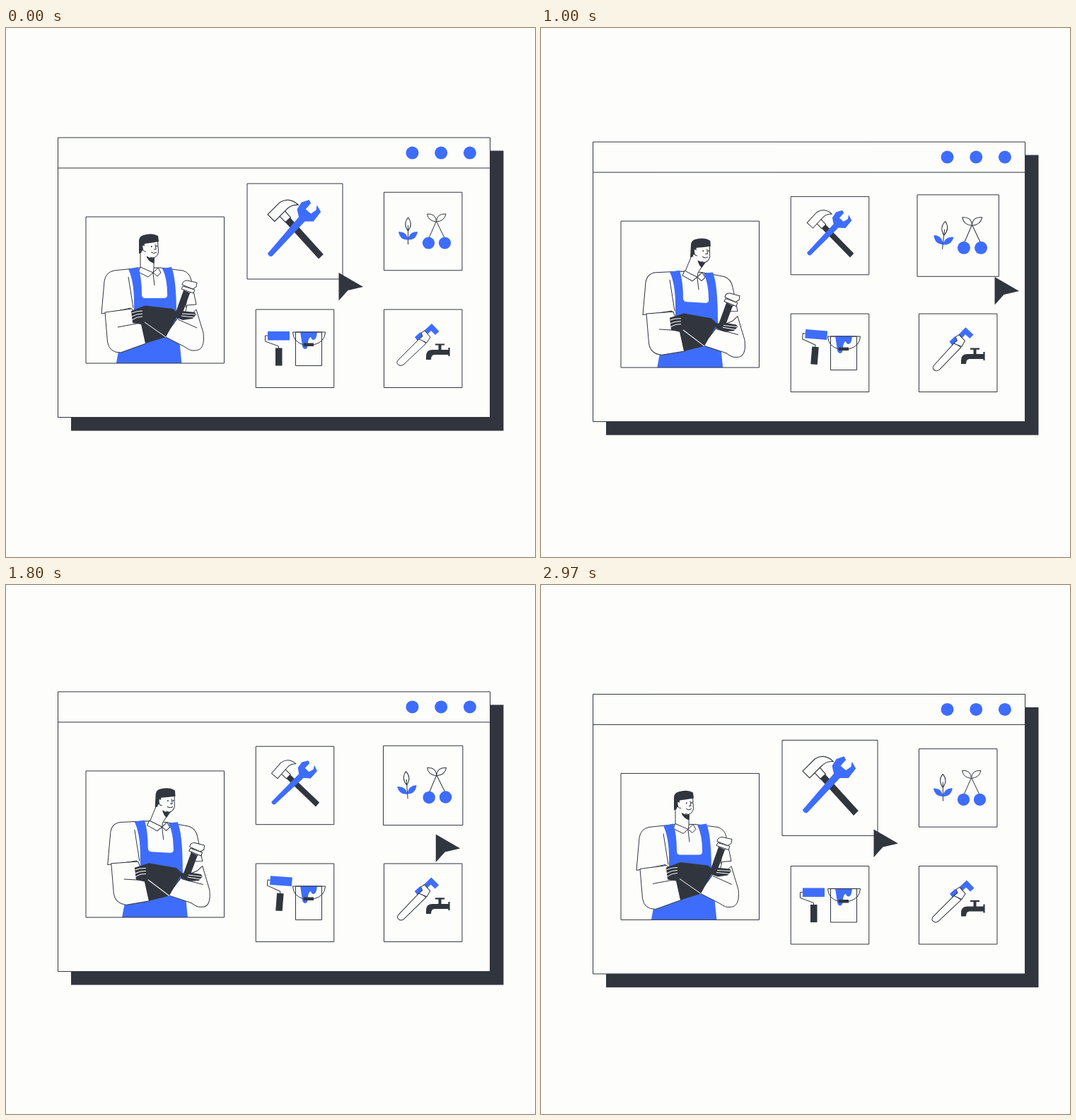
Animation of 748 by 748 pixels, one loop 3.01 s. Source, as an HTML page with a canvas:

```html
<!DOCTYPE html>
<html lang="en">
<head>
<meta charset="utf-8">
<title>Repair services</title>
<style>
html, body { margin: 0; width: 100%; height: 100%; overflow: hidden; background: #fdfdfc; }
canvas { display: block; width: 748px; height: 748px; }
</style>
</head>
<body>
<canvas id="stage" width="748" height="748"></canvas>
<script>
const ctx = document.getElementById('stage').getContext('2d');
const LOOP = 3010;
const DARK = '#31363e', BLUE = '#3e6dfb', PAPER = '#fdfdfc';

// progress from a to b, eased at both ends
function ease(t, a, b) {
  const p = Math.min(1, Math.max(0, (t - a) / (b - a)));
  return p * p * (3 - 2 * p);
}
const bump = (t, a, b, c, d) => ease(t, a, b) - ease(t, c, d);

function fill(d, color) {
  ctx.fillStyle = color;
  ctx.fill(new Path2D(d));
}
function line(d, color = DARK, width = 1) {
  ctx.strokeStyle = color;
  ctx.lineWidth = width;
  ctx.stroke(new Path2D(d));
}
function shape(d, color = PAPER) {
  fill(d, color);
  line(d);
}
function disc(x, y, r) {
  ctx.fillStyle = BLUE;
  ctx.beginPath();
  ctx.arc(x, y, r, 0, 7);
  ctx.fill();
}
function group(draw) {
  ctx.save();
  draw();
  ctx.restore();
}
function turn(deg, x, y) {
  ctx.translate(x, y);
  ctx.rotate(deg * Math.PI / 180);
  ctx.translate(-x, -y);
}
function zoom(k, x, y) {
  ctx.translate(x, y);
  ctx.scale(k, k);
  ctx.translate(-x, -y);
}
function frame(cx, cy, w, h = w) {
  ctx.strokeStyle = DARK;
  ctx.lineWidth = 1;
  ctx.strokeRect(cx - w / 2, cy - h / 2, w, h);
}

function drawWindow() {
  ctx.fillStyle = DARK;
  ctx.fillRect(92, 173.5, 611.5, 396);
  ctx.fillStyle = PAPER;
  ctx.fillRect(73.5, 155, 611, 395.5);
  frame(379, 352.75, 611, 395.5);
  line('M73.5 198H684.5');
}

function drawDots(t) {
  for (let i = 0; i < 3; i++) {
    let lift = 0;
    for (let n = 0; n < 3; n++) {
      const p = (t - 168 - n * 935 - i * 78) / 410;
      if (p > 0 && p < 1) lift = 12 * Math.sin(Math.PI * p) ** 1.5;
    }
    disc(574.5 + i * 40.7, 176.5 - lift, 9);
  }
}

function drawHead(h) {
  ctx.translate(23 * h, 0);
  turn(3 * h, 202, 320);
  fill('M190 302L214 300L215 318Q214 324 208 325L196 322L190 315Z', PAPER);
  line('M214.5 301L215.5 317Q214 324 208 325L204 324');
  fill('M188 319L188 301Q188 295 194 293Q207 289 215 294L216 302Q205 304 196 305L195 314Q192 314 191 318Z', DARK);
  shape('M196 308Q192 305 193 311Q194 317 198 316');
  line('M211 306L212 313L209 313');
  line('M205 317Q209 320 213 317');
  ctx.fillStyle = DARK;
  ctx.fillRect(205, 308, 1.5, 2);
  ctx.fillRect(212.5, 307.5, 1.5, 2);
}

function drawNeck(h, b) {
  const top = 23 * h, low = 13 * b;
  shape(`M${190 + top} 316L${190 + low} 340L${208 + low} 347L${209 + low} 340L${209 + top} 324Z`);
  fill(`M${198 + top} 321Q${202 + top} 326 ${210 + top} 325L${209.5 + (top + low) / 2} 333Q${200 + top} 330 ${198 + top} 321Z`, DARK);
}

function drawHammer(b) {
  ctx.translate(2 * b, 9 * b);
  fill('M251 371L260 375L249 405L240 402Z', DARK);
  shape('M253 364L263 367L260 375L251 371Z');
  shape('M248 369L250 365L267 370L265 375Z');
  shape('M249 363Q250 357 256 357L270 360L269 366L264 369Z');
}

function drawArms(b) {
  const d = 6 * b, x = -4 * b;
  shape(`M140 402L143.5 444Q146 459 162 459L${198 + x} ${446 + d}L${191 + x} ${414 + d}L178 397Z`);
  line(`M158 423L${190 + x} ${417 + d}`);
  shape(`M269 398L279 431Q282 456 267 456Q261 457 253 451L${224 + x} ${436 + d}L${243 + x} ${410 + d}L262 405Z`);
  line(`M${243 + x} ${412 + d}L270 424`);
  group(() => drawHammer(b));
  group(() => {
    ctx.translate(x, d);
    fill('M177 400L197 392.5L236 397L244 404L226 437L197 446L191 419L179 417Z', DARK);
    for (let i = 0; i < 3; i++) line(`M178 ${403 + i * 5}Q185 ${400 + i * 4} 193 ${400 + i * 4}`, PAPER);
    line('M196 416L226 437', PAPER);
  });
  group(() => {
    ctx.translate(0, 8 * b);
    fill('M237 403L248 400L267 402L269 405L264 411L250 413L239 409Z', DARK);
    line('M249 404L268 405M248 407L266 409', PAPER);
  });
}

function drawWorker(t) {
  const b = bump(t, 250, 650, 1760, 2197);
  const h = bump(t, 250, 795, 1760, 2305);
  group(() => {
    ctx.beginPath();
    ctx.rect(113, 267, 195.5, 207);
    ctx.clip();
    const k = 0.06 * b;
    const lean = () => ctx.transform(1, k, 0, 1, 9 * b, -210 * k);
    group(() => {
      lean();
      shape('M190 339L153 343Q141 345 139 358L135 404Q155 401 176 396L184 450H242L256 392L269 391L262 357Q260 346 250 343L218 339Z');
      line('M173 352L180 396M257 374L254 395');
    });
    drawNeck(h, b);
    group(() => drawHead(h));
    group(() => {
      lean();
      group(() => {
        ctx.translate(4 * b, 0);
        line('M208 347L210 364');
        shape('M187 345L190 338L208 346L201 352Z');
        shape('M208 346L215 339L219 346L214 351Z');
      });
      fill('M173 341L187 338Q192 353 192 377Q192 382 197 382H223Q229 382 228 376Q228 354 221 340L234 338Q241 355 241 405L245 440L250 490H153L159 457L182 446L181 396Q182 360 173 341Z', BLUE);
      drawArms(b);
    });
  });
  frame(210.75, 370.5, 195.5, 207);
}

function drawTools(spread) {
  group(() => {
    turn(-spread, 409, 290);
    fill('M396.5 276L403 271.5L441.5 314L436 319.5Z', DARK);
    shape('M390 269L396.5 263.5L403.5 271.5L397.5 277Z');
    shape('M377 268L391 254Q402 247 412.5 257Q404 256 398 263L385 276Z');
  });
  group(() => {
    turn(spread, 409, 287);
    fill('M377 313L413 271L411 262L416 254L425 251L427 255L421 262L427 267L433 263L434 257L438.5 265L430 276L420 276L382.5 316Q379 318 377 313Z', BLUE);
  });
}

function drawPlant(tilt) {
  turn(tilt, 568.5, 306);
  shape('M568.5 268Q561 277 568.5 287Q576 277 568.5 268Z');
  line('M568.5 279V306');
  fill('M555 288Q567 288 568.5 299.5Q557 300 555 288Z', BLUE);
  fill('M582 288Q570 288 568.5 299.5Q580 300 582 288Z', BLUE);
}

function drawCherries(swing, swell) {
  ctx.translate(2.2 * swell, -1.5 * swell);
  zoom(1 + 0.08 * swell, 608.5, 290);
  group(() => {
    turn(-swing, 608.5, 273);
    line('M608.5 273L598 297M608.5 273L620 297');
    disc(597.5, 304, 8.6);
    disc(620.5, 304, 8.6);
  });
  shape('M608.5 274Q597 273 595.5 263Q608 262 608.5 274Z');
  shape('M608.5 274Q620 273 622 263Q609 262 608.5 274Z');
}

function drawRoller(lift, tilt) {
  ctx.translate(4.6 * tilt, -25 * lift);
  turn(8.7 * tilt, 385.5, 450);
  line('M370 435H366.5V443L385.5 450V453');
  ctx.fillStyle = BLUE;
  ctx.fillRect(370, 429, 31, 12.5);
  ctx.fillStyle = DARK;
  ctx.fillRect(381, 452.5, 9.5, 25);
}

function drawBucket() {
  shape('M409.5 430H446.5V477.5H409.5Z');
  fill('M416 429.5H440Q439 441 435 441Q432 441 431 437Q428 438 427 444Q427 454 423 454Q419 454 418.5 446Z', BLUE);
  line('M405.5 430H451.5Q451 444 435 448H421Q406 444 405.5 430');
  ctx.fillStyle = DARK;
  ctx.fillRect(421, 445.5, 14, 4.5);
}

function drawPipeWrench(tilt) {
  turn(tilt, 584, 448);
  fill('M578 437L586 430L591 437L583 444ZM588 431L602 418L612.5 429L607 434L601 428L594 435Z', BLUE);
  shape('M585 439L594 446L562 476Q558 479 554.5 476Q551 473 555 469Z');
  shape('M587 431L592 428L600 437L595 445L584 440L589 436Z');
}

function drawTap(t) {
  const grow = ease(t, 1150, 1330), fade = ease(t, 1640, 1740);
  if (grow > 0 && fade < 1) {
    const fall = Math.max(0, t - 1310) / 220;
    group(() => {
      ctx.globalAlpha = 1 - fade;
      ctx.translate(597.5, 470 + 15 * fall ** 1.6);
      ctx.scale(grow, grow);
      fill('M0 -5Q3 0 2.6 1.5A2.6 2.6 0 0 1 -2.6 1.5Q-3 0 0 -5Z', BLUE);
    });
  }
  fill('M594 469V464Q594 455 603 455H626V462H606Q601 462 601 469Z', DARK);
  line('M626.5 452V464M607 447.5H620', DARK, 2.2);
  line('M613.5 448V456', DARK, 4);
}

function drawCursor(t) {
  const p = bump(t, 402, 1002, 1630, 2230);
  ctx.translate(171 * p, 66 * p * (1 - p));
  fill('M470.5 346L505 366L483.5 371L470.5 385.5Z', DARK);
}

function draw(t) {
  const wave = Math.sin(2 * Math.PI * t / LOOP);
  const hoverA = 1 - bump(t, 370, 590, 2130, 2380);
  const hoverB = bump(t, 920, 1170, 1590, 1850);
  const tiltA = bump(t, 250, 550, 750, 1280), tiltB = bump(t, 1650, 1950, 2150, 2700);
  const lift = bump(t, 250, 550, 750, 1150) + bump(t, 1650, 1950, 2150, 2550);

  ctx.fillStyle = PAPER;
  ctx.fillRect(0, 0, 748, 748);
  group(() => {
    ctx.translate(0, 7 * wave);
    drawWindow();
    drawDots(t);
    drawWorker(t);

    const sizeA = 1 + 0.222 * hoverA, sizeB = 1 + 0.18 * hoverB;
    frame(408.5, 287.5, 110.5 * sizeA);
    group(() => {
      zoom(sizeA, 408.5, 287.5);
      drawTools(4 * tiltA + 8 * tiltB);
    });
    frame(589.7, 287.5, 110.5 * sizeB);
    group(() => {
      zoom(sizeB, 589.7, 287.5);
      group(() => drawPlant(7 * wave));
      group(() => drawCherries(12 * bump(t, 1750, 2040, 2100, 2400), bump(t, 350, 650, 700, 1050)));
    });
    frame(408.5, 453.25, 110.5);
    drawBucket();
    group(() => drawRoller(lift, tiltA + tiltB));
    frame(589.7, 453.25, 110.5);
    group(() => drawPipeWrench(-3.8 * wave * wave));
    drawTap(t);
    group(() => drawCursor(t));
  });
}

const start = performance.now();
function tick() {
  draw((performance.now() - start) % LOOP);
  requestAnimationFrame(tick);
}
ctx.lineJoin = 'round';
tick();
</script>
</body>
</html>
```
